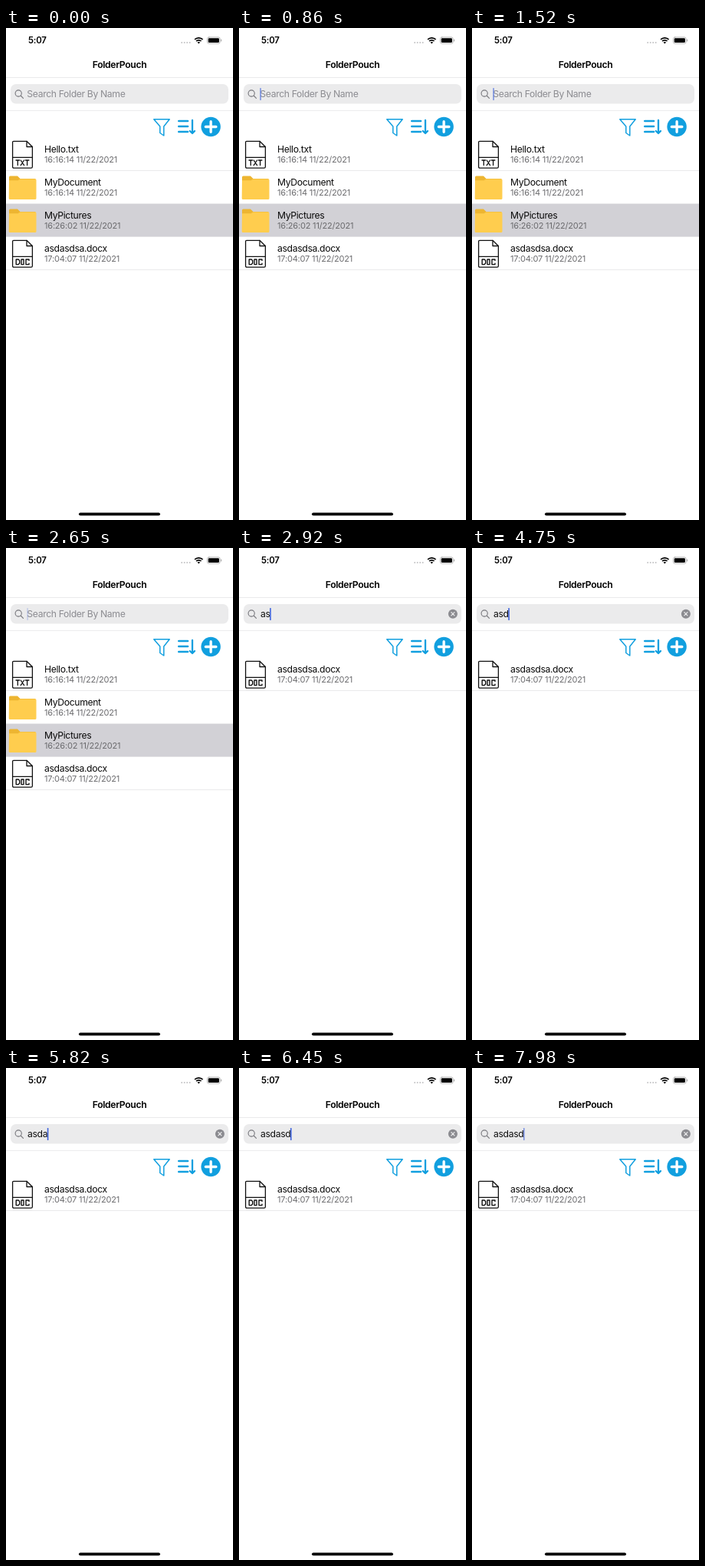
An HTML page with a canvas that plays this animation: 296x640 px, repeating every 8 s.

```html
<!DOCTYPE html>
<html lang="en">
<head>
<meta charset="utf-8">
<title>File list search</title>
<style>
html, body { margin: 0; width: 100%; height: 100%; overflow: hidden; background: #fff; }
canvas { display: block; width: 296px; height: 640px; }
</style>
</head>
<body>
<canvas id="stage"></canvas>
<script>
const W = 296, H = 640, LOOP = 8000;
const BLUE = '#119fdf', CARET = '#3f63dc', GREY = '#8b8b90';
const canvas = document.getElementById('stage');
const dpr = window.devicePixelRatio || 1;
canvas.width = W * dpr;
canvas.height = H * dpr;
const ctx = canvas.getContext('2d');

const files = [
  { name: 'Hello.txt', date: '16:16:14 11/22/2021', kind: 'TXT' },
  { name: 'MyDocument', date: '16:16:14 11/22/2021' },
  { name: 'MyPictures', date: '16:26:02 11/22/2021', picked: true },
  { name: 'asdasdsa.docx', date: '17:04:07 11/22/2021', kind: 'DOC' }
];

// [start time, value]
const typing = [[0, ''], [2920, 'as'], [4750, 'asd'], [5820, 'asda'], [6170, 'asdas'], [6450, 'asdasd']];
const OFF = 0.22, MID = 0.65;
const caret = [
  [0, 0], [500, MID], [620, OFF], [860, MID], [980, 1],
  [1520, MID], [1630, OFF], [1870, MID], [1990, 1], [2530, MID], [2650, OFF],
  [2920, 1], [3540, OFF], [3780, MID], [3900, 1], [4440, MID], [4560, OFF],
  [4750, 1], [7080, OFF], [7320, MID], [7440, 1], [7980, MID]
];

function valueAt(steps, t) {
  let value = steps[0][1];
  for (const [start, v] of steps) if (t >= start) value = v;
  return value;
}

function setFont(size, weight, spacing) {
  ctx.font = `${weight} ${size}px Inter, "Liberation Sans", sans-serif`;
  ctx.letterSpacing = spacing + 'px';
}

function text(str, x, y, color, size = 12.2, weight = 400, spacing = -0.35, align = 'left') {
  setFont(size, weight, spacing);
  ctx.textAlign = align;
  ctx.fillStyle = color;
  ctx.fillText(str, x, y);
}

function rect(x, y, w, h, color, r = 0) {
  ctx.fillStyle = color;
  ctx.beginPath();
  ctx.roundRect(x, y, w, h, r);
  ctx.fill();
}

function disc(x, y, r, color) {
  ctx.fillStyle = color;
  ctx.beginPath();
  ctx.arc(x, y, r, 0, Math.PI * 2);
  ctx.fill();
}

function path(d, color, width, filled) {
  const p = new Path2D(d);
  ctx.lineCap = ctx.lineJoin = 'round';
  if (filled) {
    ctx.fillStyle = color;
    ctx.fill(p);
  } else {
    ctx.strokeStyle = color;
    ctx.lineWidth = width;
    ctx.stroke(p);
  }
}

function statusBar() {
  text('5:07', 29, 20.3, '#000', 11.4, 600, -0.2);
  for (let i = 0; i < 4; i++) disc(229.2 + i * 3.5, 19, 1, '#c3c3c5');

  // Wi-Fi fan
  ctx.save();
  ctx.beginPath();
  ctx.moveTo(251.3, 20.5);
  ctx.lineTo(243.3, 12);
  ctx.lineTo(251.3, 9);
  ctx.lineTo(259.3, 12);
  ctx.clip();
  ctx.strokeStyle = '#000';
  ctx.lineWidth = 1.7;
  for (const r of [4.7, 7.7]) {
    ctx.beginPath();
    ctx.arc(251.3, 20.5, r, Math.PI, 0);
    ctx.stroke();
  }
  disc(251.3, 20.5, 2.6, '#000');
  ctx.restore();

  ctx.strokeStyle = '#aaa';
  ctx.lineWidth = 0.8;
  ctx.beginPath();
  ctx.roundRect(262.4, 11.9, 16.8, 8.4, 2.3);
  ctx.stroke();
  rect(263.7, 13.2, 14.2, 5.8, '#000', 1.3);
  rect(280, 14.6, 1.1, 3, '#aaa', 0.6);
}

function searchBox(query, alpha) {
  rect(6, 73, 284, 25.5, '#ebebec', 7);
  path('M20.3 85 a4.1 4.1 0 1 1 -8.2 0 a4.1 4.1 0 1 1 8.2 0 M19.2 88 L22.5 91.3', '#77777c', 1.1);
  if (query) {
    text(query, 28, 90.3, '#111');
    disc(278.9, 85.8, 6, GREY);
    path('M276.8 83.7 l4.2 4.2 m0 -4.2 l-4.2 4.2', '#f2f2f3', 1.1);
  } else {
    text('Search Folder By Name', 27.3, 90.3, '#8c8c91');
  }
  setFont(12.2, 400, -0.35);
  const x = query ? 28 + ctx.measureText(query).width - 0.4 : 27.3;
  ctx.globalAlpha = alpha;
  rect(x, 78, 1.6, 16, CARET, 0.6);
  ctx.globalAlpha = 1;
}

function toolbar() {
  path('M192.8 118.8 H213.2 L205.8 128 V140 L200.8 136.5 V128 Z', BLUE, 1.5);
  for (const [y, end] of [[121, 237], [128, 237], [135, 237]])
    path(`M225.3 ${y} H${end}`, BLUE, 2.6);
  path('M243 120 V137 L239.8 134 M243 137 L246 134', BLUE, 2.3);
  disc(267.1, 128.5, 12.7, BLUE);
  path('M267.1 121.7 V135.3 M260.3 128.5 H273.9', '#fff', 3.3);
}

function page(kind) {
  path('M9.8 147.3 H27 L34.4 154.5 V180.5 Q34.4 182.2 32.7 182.2 H10.3 Q8.6 182.2 8.6 180.5 V148.5 Q8.6 147.3 9.8 147.3 Z', '#111', 1.3);
  path('M27 147.5 V154.5 H34.2 M8.8 168.3 H34.2', '#111', 1.3);
  if (kind === 'TXT')
    path('M13 172 h4.6 M15.3 172 v6.6 M19.2 172 l4.4 6.6 m0 -6.6 l-4.4 6.6 M25.3 172 h4.6 M27.6 172 v6.6', '#111', 1.3);
  else
    path('M13.2 172 h3 l1.5 1.5 v3.6 l-1.5 1.5 h-3 Z M20 172 h3 v6.6 h-3 Z M30 173.4 v-1.4 h-4 v6.6 h4 v-1.4', '#111', 1.4);
}

function folder() {
  path('M4 151 Q4 149.5 5.5 149.5 H15 L18.5 153 H37.5 Q39 153 39 154.5 V178 H4 Z', '#edb531', 0, true);
  path('M4 155.2 H15.5 L18.5 153.6 H38 Q39.5 153.6 39.5 155 V178.5 Q39.5 180 38 180 H5.2 Q3.7 180 3.7 178.5 Z', '#ffcd4e', 0, true);
}

function row(file, i) {
  ctx.save();
  ctx.translate(0, i * 43);
  if (file.picked) rect(0, 143, W, 42.5, '#d2d1d6');
  if (file.kind) page(file.kind);
  else folder();
  text(file.name, 50, 161.8, '#0a0a0a');
  text(file.date, 50, 174.8, '#6b6b6e', 11, 400, -0.2);
  rect(0, 185, W, 0.8, '#e3e3e5');
  ctx.restore();
}

function draw(t) {
  const query = valueAt(typing, t);
  ctx.setTransform(dpr, 0, 0, dpr, 0, 0);
  rect(0, 0, W, H, '#fff');
  statusBar();
  text('FolderPouch', 148, 51.5, '#000', 12.2, 600, -0.35, 'center');
  rect(0, 64, W, 0.8, '#e3e3e5');
  searchBox(query, valueAt(caret, t));
  rect(0, 107, W, 0.8, '#e6e6e8');
  toolbar();
  files.filter(f => f.name.startsWith(query)).forEach(row);
  rect(95, 630.4, 106, 3.8, '#000', 1.9);
}

const start = performance.now();
function tick() {
  draw((performance.now() - start) % LOOP);
  requestAnimationFrame(tick);
}
tick();
</script>
</body>
</html>
```
